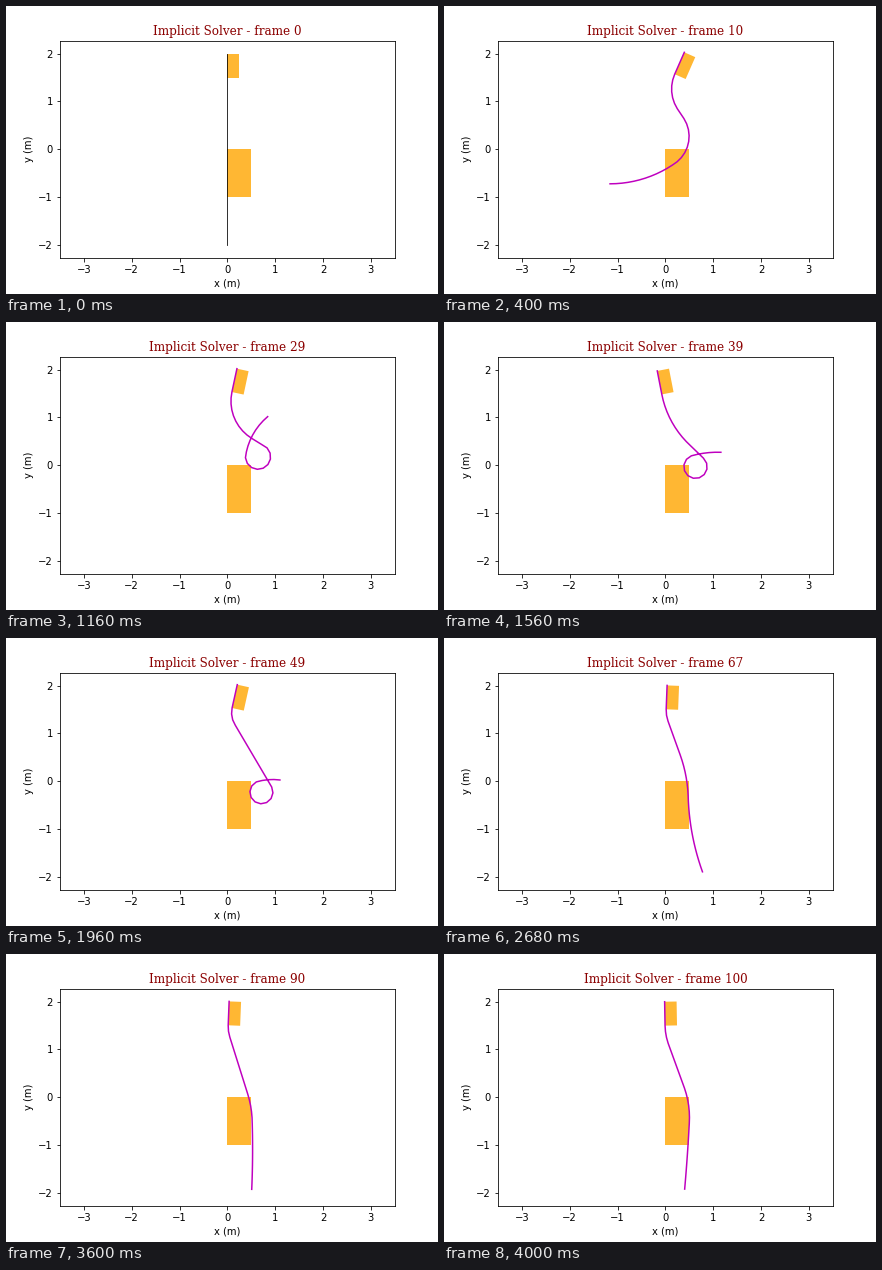
Recreate the animation shown at these times as a matplotlib script. Size 432 by 288 pixels, loop 4.04 s.

```python
import numpy as np
import matplotlib.pyplot as plt
from matplotlib.animation import FuncAnimation
from matplotlib.patches import Polygon, Rectangle

N_FRAMES, INTERVAL = 101, 40
LENGTH, N_SEG = 4.0, 32
CLAMP_W, CLAMP_H = 0.25, 0.5

# The rope hangs from a leaning clamp, bends at the shoulder, then in a loop,
# then along the tail. Angles in degrees, positions along the rope in metres.
# step, lean, shoulder turn, shoulder end, loop turn, loop start, loop end, tail turn
KEYS = np.array([
    (0, 0, 0, 1.3, 0, 1.2, 2.4, 0),
    (20, 36.4, 95, 1.3, -173, 1.75, 2.75, -57),
    (39, -11, 35, 1.7, -301, 2.13, 3.4, -17),
    (49, 12.5, 43, 0.85, -286, 2.36, 3.55, -22),
    (56, 7, 26, 0.8, -200, 3.05, 3.75, -10),
    (67, 2.2, 22, 0.75, -18, 1.5, 2.4, 18),
    (80, 4.2, 20.5, 0.65, -11.5, 2.0, 2.5, -2),
    (100, -1, 19, 0.9, -23, 1.85, 2.6, -2),
])
TIMES, POSES = KEYS[:, 0], KEYS[:, 1:]
SLOPES = np.gradient(POSES, TIMES, axis=0)


def pose_at(step):
    """Cubic Hermite blend of the key poses."""
    i = min(np.searchsorted(TIMES, step, side="right") - 1, len(TIMES) - 2)
    h = TIMES[i + 1] - TIMES[i]
    u = (step - TIMES[i]) / h
    return ((1 + 2 * u) * (1 - u)**2 * POSES[i]
            + u * (1 - u)**2 * h * SLOPES[i]
            + u**2 * (3 - 2 * u) * POSES[i + 1]
            + u**2 * (u - 1) * h * SLOPES[i + 1])


def ramp(s, start, end):
    return np.clip((s - start) / (end - start), 0, 1)


def rope_at(step):
    """Points of the rope from top to tip, and the lean of the clamp."""
    lean, shoulder, shoulder_end, loop, start, end, tail = pose_at(step)
    s = (np.arange(N_SEG) + 0.5) * LENGTH / N_SEG
    heading = np.radians(-90 - lean
                         + shoulder * ramp(s, CLAMP_H, shoulder_end)
                         + loop * ramp(s, start, end)
                         + tail * ramp(s, end, LENGTH))
    lean = np.radians(lean)
    sway, lift = np.sin(lean), 1 - np.cos(lean)
    top = np.array([0.92 * sway + 0.3 * lift, 2 + 0.12 * sway - 0.25 * lift])
    links = np.column_stack([np.cos(heading), np.sin(heading)]) * LENGTH / N_SEG
    return top + np.vstack([[0, 0], np.cumsum(links, axis=0)]), lean


def clamp_at(top, lean):
    across = CLAMP_W * np.array([np.cos(lean), -np.sin(lean)])
    down = CLAMP_H * np.array([-np.sin(lean), -np.cos(lean)])
    return [top, top + across, top + across + down, top + down]


plt.rcParams["font.family"] = "DejaVu Sans"
fig = plt.figure(figsize=(6, 4), dpi=72, facecolor="white")
fig.subplots_adjust(left=0.125, right=0.9, bottom=0.125, top=0.88)
ax = fig.add_subplot()
ax.set(xlim=(-3.5, 3.5), ylim=(-2.273, 2.273), xlabel="x (m)", ylabel="y (m)",
       xticks=range(-3, 4), yticks=range(-2, 3))
title = ax.set_title("", fontfamily="DejaVu Serif", fontsize=12, color="darkred")

block = dict(facecolor="orange", edgecolor="none", alpha=0.8)
ax.add_patch(Rectangle((0, -1), 0.5, 1, **block))
clamp = ax.add_patch(Polygon([(0, 2), (0.25, 2), (0.25, 1.5), (0, 1.5)], **block))
rope, = ax.plot([], [])


def update(step):
    path, lean = rope_at(step)
    rope.set_data(path[:, 0], path[:, 1])
    rope.set(color="m" if step else "k", linewidth=1.5 if step else 0.8)
    clamp.set_xy(clamp_at(path[0], lean))
    title.set_text(f"Implicit Solver - frame {step}")
    return rope, clamp, title


anim = FuncAnimation(fig, update, frames=N_FRAMES, interval=INTERVAL,
                     repeat=True, repeat_delay=0, blit=False)
plt.show()
```
